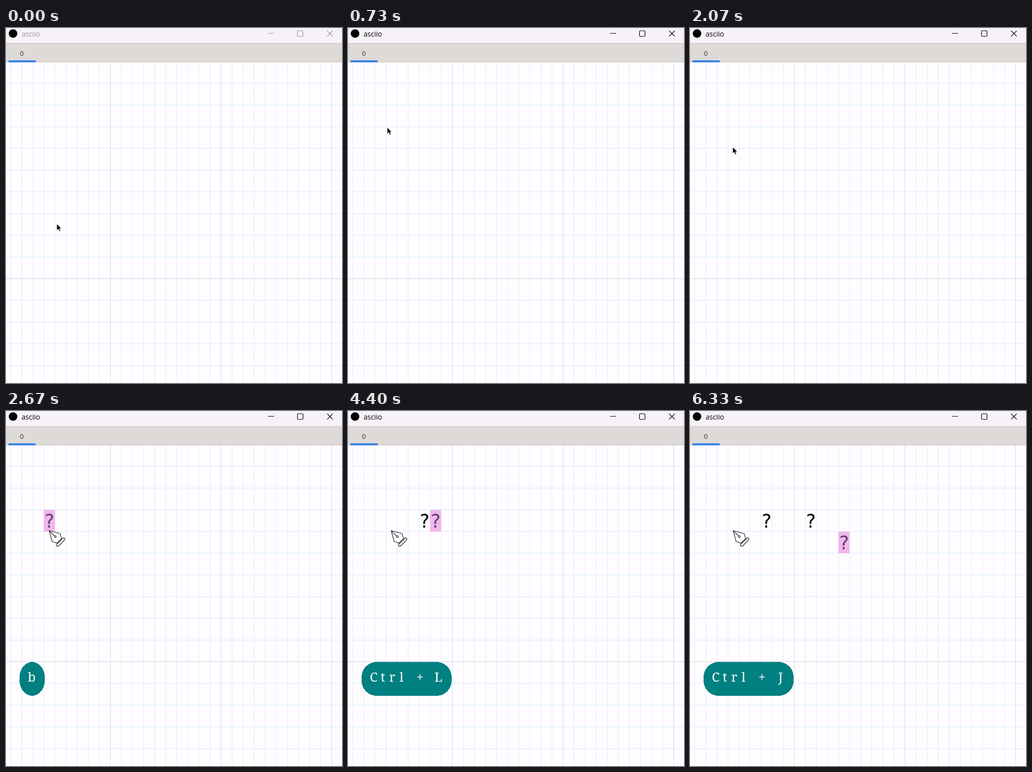
Recreate the animation shown at these times as an HTML page. Size 668x703 px, loop 8000 ms.

```html
<!DOCTYPE html>
<html lang="en">
<head>
<meta charset="utf-8">
<title>asciio</title>
<style>
html, body { margin: 0; width: 100%; height: 100%; overflow: hidden; background: #fffdff; }
svg { display: block; }
text { white-space: pre; }
.cell { font: 36.5px "DejaVu Sans Mono", monospace; }
.key { font: 300 25.5px "Noto Serif", serif; text-anchor: middle; fill: #fff; }
.chrome { fill: none; stroke: currentColor; stroke-width: 1.2; }
</style>
</head>
<body>
<svg width="668" height="703" viewBox="0 0 668 703">
  <g id="grid" shape-rendering="crispEdges"></g>

  <rect width="668" height="30" fill="#f7f2f7"/>
  <circle cx="14" cy="11" r="8.5"/>
  <g id="title">
    <text x="31" y="17" fill="currentColor" font-size="14" font-family="'Open Sans', sans-serif">asciio</text>
    <path class="chrome" d="M521 10.5h12M638.5 5.5l11 11m0-11l-11 11"/>
    <rect class="chrome" x="579.5" y="5.5" width="11" height="11" rx="1.5"/>
  </g>
  <rect y="30" width="668" height="38" fill="#dddad7"/>
  <path d="M0 30.5h668M0 67.5h668" stroke="#cac5c3"/>
  <text x="31.5" y="55" text-anchor="middle" font-size="13" font-family="'Open Sans', sans-serif" fill="#2e3436">0</text>
  <rect x="5" y="64" width="54" height="4" fill="#3584e4"/>

  <text class="cell" id="stamp1" x="141" y="231">?</text>
  <text class="cell" id="stamp2" x="229" y="231">?</text>
  <g id="brush">
    <rect width="22" height="43" fill="#f2b7ec"/>
    <text class="cell" y="35" fill="#5f4070">?</text>
  </g>

  <g id="badge">
    <rect id="pill" x="27" y="497" height="67" ry="30" fill="#008080" shape-rendering="crispEdges"/>
    <text id="key" class="key" y="536"></text>
  </g>

  <path id="arrow" d="M0 0V12.5L3 9.8L5.2 14.6L7.3 13.6L5.2 9H9Z" stroke="#fff" stroke-width=".6"/>
  <g id="pen" transform="translate(86 237)" fill="#fff" stroke="#222" stroke-width="1.2" stroke-linejoin="round">
    <path d="M0 0Q12 3 22 6Q22 11 25 15L15 25Q11 22 6 22Q3 12 0 0Z"/>
    <path d="M0 0L10.5 10.5"/>
    <circle cx="12" cy="12" r="1.8"/>
    <path d="M27 15Q30 13 31 16Q31 18 29 20L20 29Q18 31 16 31Q13 30 15 27Z"/>
  </g>
</svg>
<script>
const $ = id => document.getElementById(id);
const LOOP = 8000, CELL_W = 22, CELL_H = 43, KEY_W = 18.4;

// mouse path: time, x, y
const path = [
  [0, 101, 388], [200, 101, 388], [330, 97, 350], [470, 97, 350],
  [730, 78, 197], [800, 78, 197], [1200, 84, 240], [1330, 85, 236]
];

// key presses: time, label, column step, row step
const right = t => [t, "Ctrl + L", 1, 0];
const presses = [
  [2470, "b", 0, 0],
  ...[3400, 3530, 3670].map(right),
  [4070, "Return", 0, 0],
  ...[4400, 4530, 4670, 4870].map(right),
  [5200, "Return", 0, 0],
  ...[5670, 5800, 5930].map(right),
  [6270, "Ctrl + J", 0, 1]
];

function buildGrid() {
  let thin = "", thick = "";
  const column = (x, color) => `<rect x="${x}" y="68" width="1" height="635" fill="${color}"/>`;
  const row = (y, color) => `<rect y="${y}" width="668" height="1" fill="${color}"/>`;
  for (let i = 0; i < 30; i++) {
    const x = 9 + i * CELL_W;
    if (i % 10 === 9) thick += column(x, "#cbdaf3");
    else thin += column(x, "#e8e5f8");
  }
  for (let i = 0; i < 14; i++) {
    const y = 109 + i * CELL_H;
    if (i === 9) thick += row(y, "#cad3dc");
    else thin += row(y, "#d5ebff");
  }
  $("grid").innerHTML = thin + thick;
}

function mouseAt(t) {
  const i = path.findIndex(p => p[0] > t);
  if (i < 0) return path[path.length - 1].slice(1);
  const [t0, x0, y0] = path[i - 1], [t1, x1, y1] = path[i];
  const k = (t - t0) / (t1 - t0);
  return [x0 + (x1 - x0) * k, y0 + (y1 - y0) * k].map(Math.round);
}

const show = (id, on) => $(id).setAttribute("visibility", on ? "visible" : "hidden");

// typewriter pitch: every letter centred in its own slot
function drawBadge(label) {
  const width = Math.round(label.length * KEY_W + 31.5);
  $("key").textContent = label;
  $("key").setAttribute("x", [...label].map((_, i) => 42 + KEY_W * (i + 0.5)).join(" "));
  $("pill").setAttribute("width", width);
  $("pill").setAttribute("rx", Math.min(30, width / 2));
}

function draw(t) {
  $("title").style.color = t < 470 ? "#999" : "#000";

  const done = presses.filter(p => p[0] <= t);
  const drawing = done.length > 0;
  show("arrow", !drawing);
  for (const id of ["pen", "brush", "badge"]) show(id, drawing);
  show("stamp1", t >= 4400);
  show("stamp2", t >= 5670);

  if (!drawing) {
    $("arrow").setAttribute("transform", `translate(${mouseAt(t)})`);
    return;
  }
  let x = 75, y = 196;
  for (const [, , dx, dy] of done) {
    x += dx * CELL_W;
    y += dy * CELL_H;
  }
  $("brush").setAttribute("transform", `translate(${x} ${y})`);
  drawBadge(done[done.length - 1][1]);
}

function tick(now) {
  draw(now % LOOP);
  requestAnimationFrame(tick);
}

buildGrid();
draw(0);
requestAnimationFrame(tick);
</script>
</body>
</html>
```
